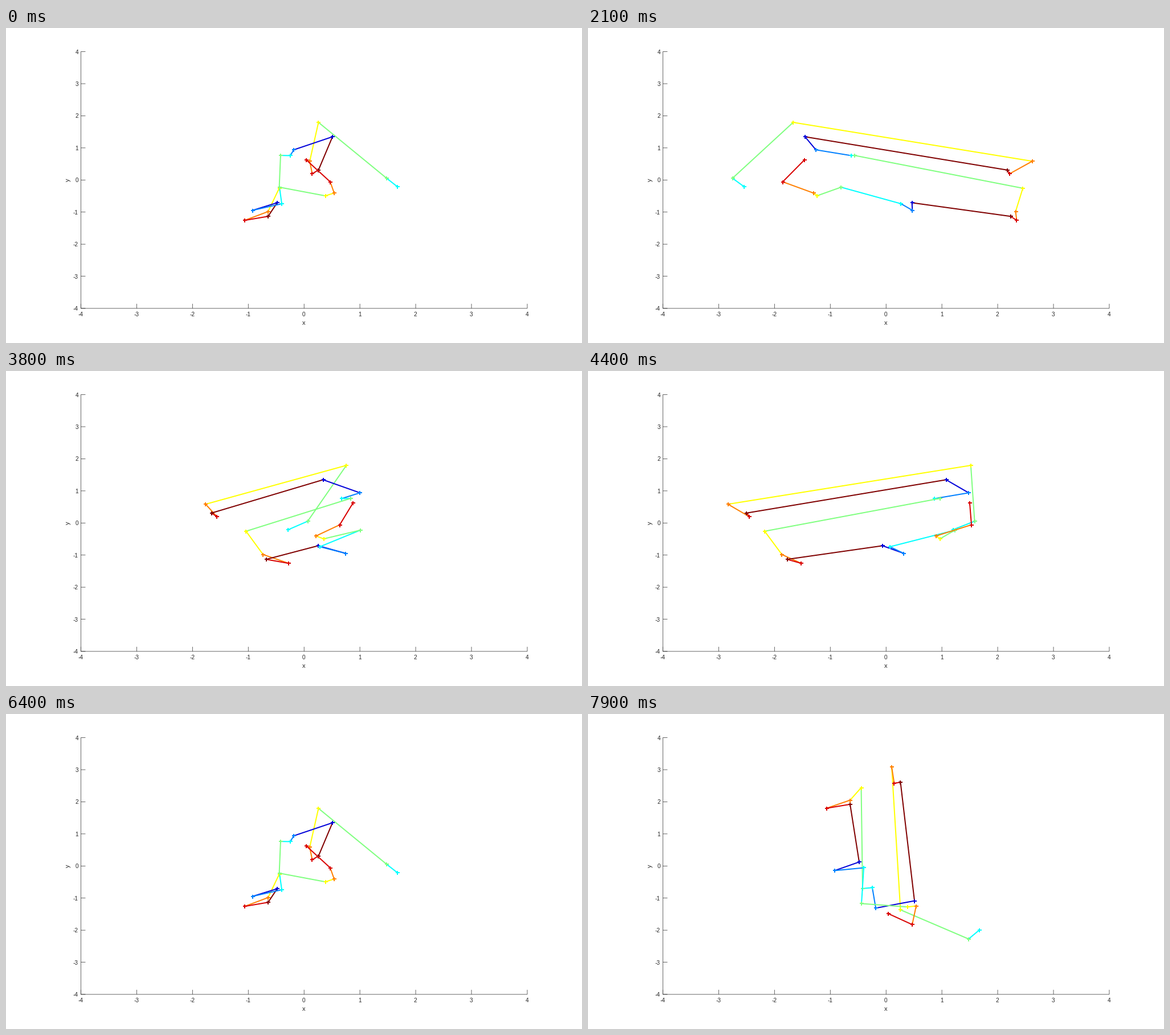
Animation, 1011 px wide and 554 px high, one loop 8 s. Source, as a matplotlib script:

```python
import numpy as np
import matplotlib.pyplot as plt
from matplotlib.animation import FuncAnimation

W, H, DPI = 1011, 554, 128
PX = 72 / DPI                       # points per pixel
LIM = 4                             # both axes run from -LIM to LIM
LEFT, RIGHT = 0.13 * W, 0.905 * W
TOP, BOTTOM = 0.075 * H, 0.89 * H
TURN = 64                           # steps in a full turn
FRAMES = 80
INK = "#262626"

# Corners of the chain: x, y, z
CHAIN = np.array([
    (1.673, -.21, -1.99), (1.479, .055, -2.33), (.258, 1.795, -1.75),
    (.101, .585, 3.025), (.146, .195, 2.59), (.258, .31, 2.6),
    (.509, 1.347, -1.375), (-.185, .94, -1.525), (-.247, .76, -.84),
    (-.421, .765, -.868), (-.446, -.257, 2.54), (-.645, -.984, 2.287),
    (-1.064, -1.258, 2.086), (-.645, -1.133, 2.185), (-.482, -.709, .268),
    (-.921, -.945, .042), (-.4, -.74, .09), (-.441, -.225, -1.15),
    (.381, -.494, -1.203), (.539, -.405, -1.19), (.468, -.057, -1.85),
    (.043, .62, -1.64),
])


def to_px(x, y):
    return (LEFT + (x + LIM) * (RIGHT - LEFT) / (2 * LIM),
            BOTTOM - (y + LIM) * (BOTTOM - TOP) / (2 * LIM))


def rainbow(i):
    """Eight-step cycle from blue to dark red; red and blue are a bit muted."""
    r, g, b = (np.clip(1.5 - abs((i % 8 + 1) / 2 - c), 0, 1) for c in (3, 2, 1))
    cap = min(1, 0.85 + g)
    return min(r, cap), g, min(b, cap)


def project(frame):
    """One turn about the vertical axis, then a turn about the horizontal one."""
    x, y, z = CHAIN.T
    if frame <= TURN:
        a = 2 * np.pi * frame / TURN
        x = x * np.cos(a) + z * np.sin(a)
    else:
        a = 2 * np.pi * (frame - TURN - 1) / TURN
        y = y * np.cos(a) + z * np.sin(a)
    return to_px(x, y)


fig = plt.figure(figsize=(W / DPI, H / DPI), dpi=DPI, facecolor="white")
ax = fig.add_axes([0, 0, 1, 1])
ax.set_xlim(0, W)
ax.set_ylim(H, 0)
ax.axis("off")


def rule(xs, ys):
    ax.plot(xs, ys, color=INK, lw=0.7 * PX, solid_capstyle="butt",
            snap=False, zorder=1)


def label(x, y, text, size=10, ha="center", **kw):
    ax.text(x, y, text, color=INK, fontsize=size * PX, ha=ha, va="baseline",
            family="Liberation Sans", **kw)


rule([LEFT, LEFT], [TOP, BOTTOM])
rule([LEFT, RIGHT], [BOTTOM, BOTTOM])
for v in range(-LIM, LIM + 1):
    tx, ty = to_px(v, v)
    rule([tx, tx], [BOTTOM, BOTTOM - 8])
    rule([LEFT, LEFT + 8], [ty, ty])
    label(tx - 0.5, BOTTOM + 14, str(v))
    label(LEFT - 4.4, ty + 4, str(v), ha="right")
cx, cy = to_px(0, 0)
label(cx - 0.5, BOTTOM + 29, "x", 11)
label(LEFT - 19, cy, "y", 11, rotation=90, rotation_mode="anchor")

# The chain starts on cyan, the third colour
links = [
    ax.plot([], [], color=rainbow(i + 2), lw=2 * PX, marker="+", ms=7 * PX,
            mew=2 * PX, solid_capstyle="butt", snap=False, zorder=2)[0]
    for i in range(len(CHAIN) - 1)
]


def draw(frame):
    x, y = project(frame)
    for i, link in enumerate(links):
        link.set_data(x[i:i + 2], y[i:i + 2])
    return links


anim = FuncAnimation(fig, draw, frames=FRAMES, interval=100,
                     repeat=True, repeat_delay=0, blit=False)
plt.show()
```
